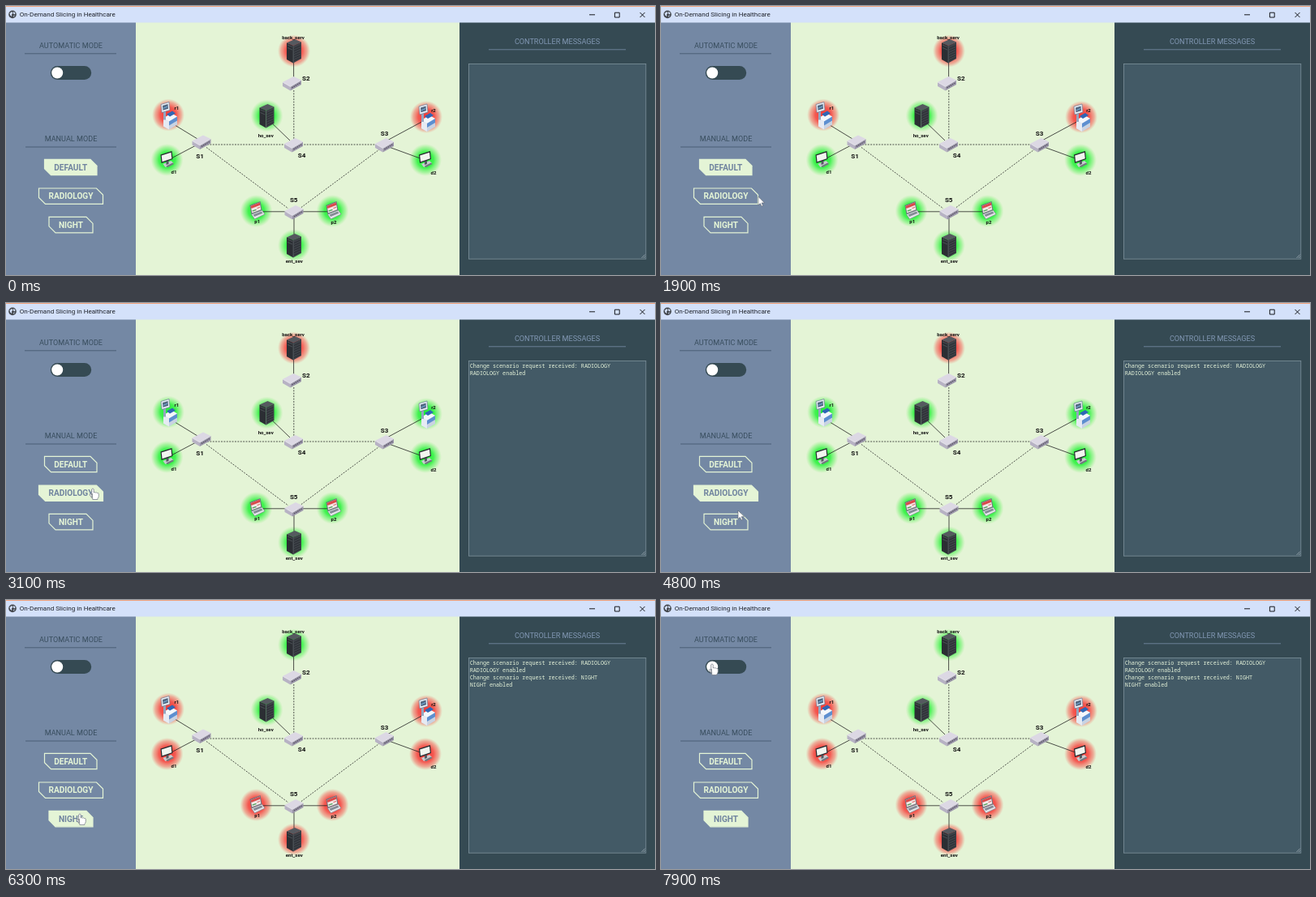
Recreate the animation shown at these times as an HTML page. Size 800 by 332 pixels, loop 8000 ms.

```html
<!DOCTYPE html>
<html lang="en">
<head>
<meta charset="utf-8">
<title>On-Demand Slicing in Healthcare</title>
<style>
html, body { margin: 0; width: 100%; height: 100%; overflow: hidden; background: #e4f4d6; }
svg { display: block; width: 100vw; height: 100vh; }
text { font-family: Roboto, Arial, sans-serif; }
.head { font-size: 9.1px; text-anchor: middle; fill: #394e5f; }
.btn text { font-size: 10.1px; font-weight: 700; text-anchor: middle; }
.btn path { stroke: #e4f4d6; stroke-width: 1.2; }
.node { font-size: 8.1px; font-weight: 700; text-anchor: middle; fill: #111; }
.host { font-size: 6.1px; font-weight: 700; text-anchor: middle; fill: #111; }
.log { font: 6.72px "Noto Sans Mono", "DejaVu Sans Mono", monospace; fill: #e6f4da; white-space: pre; }
.wire { stroke: #222; stroke-width: .8; fill: none; }
.dash { stroke-dasharray: 1.9 1.5; }
</style>
</head>
<body>
<svg id="stage" viewBox="0 0 800 332" preserveAspectRatio="none">
  <defs>
    <radialGradient id="red">
      <stop offset="0" stop-color="#f6322e"/>
      <stop offset=".5" stop-color="#f6443f" stop-opacity=".88"/>
      <stop offset=".8" stop-color="#f4655a" stop-opacity=".5"/>
      <stop offset="1" stop-color="#f08070" stop-opacity="0"/>
    </radialGradient>
    <radialGradient id="green">
      <stop offset="0" stop-color="#14f02c"/>
      <stop offset=".5" stop-color="#2cf23e" stop-opacity=".88"/>
      <stop offset=".8" stop-color="#66f264" stop-opacity=".45"/>
      <stop offset="1" stop-color="#90f080" stop-opacity="0"/>
    </radialGradient>
    <g id="server">
      <path fill="#55595f" d="M-9-10 1-14.5 9-11-1-6.5Z"/>
      <path fill="#2b2e33" d="M-9-10-1-6.5V15L-9 10.5Z"/>
      <path fill="#3d4147" d="M-1-6.5 9-11V9.5L-1 15Z"/>
      <path stroke="#22252a" stroke-width=".7" d="M0-3 8-6.6M0 0 8-3.6M0 3 8-.6M0 6 8 2.4M0 9 8 5.4M0 12 8 8.2"/>
      <path stroke="#6b7077" stroke-width=".5" fill="none" d="M-8-7.5-2-5M-8-4-2-1.4M-1-6.5V15"/>
    </g>
    <g id="switch">
      <path fill="#dcd8e4" d="M-11.5-1.5 2-8.5 11.5-4-2 4Z"/>
      <path fill="#b7b2c4" d="M-11.5-1.5-2 4V9L-11.5 3.5Z"/>
      <path fill="#9b96aa" d="M-2 4 11.5-4V1.5L-2 9Z"/>
      <path stroke="#55515f" stroke-width="1.3" stroke-dasharray="1.5 1" d="M0 5.4 10-.6"/>
      <path stroke="#f2f0f6" stroke-width=".6" fill="none" d="M-11.5-1.5-2 4 11.5-4"/>
    </g>
    <g id="scanner">
      <path fill="#c9d3e2" d="M-6 4 4-2 11 2V12L1 18-6 14Z"/>
      <path fill="#f4f7fb" d="M-6 4 4-2 11 2 1 8Z"/>
      <path fill="#5d8fd0" d="M1 8 11 2V7L1 13Z"/>
      <path fill="#e6ebf3" d="M-6 4 1 8V18L-6 14Z"/>
      <path fill="#2f66b5" d="M-2-1 5-5 9-2 2 2Z"/>
      <path fill="#94a5bf" d="M-6-5H-3V6H-6Z"/>
      <path fill="#e9eef5" stroke="#687990" stroke-width=".7" d="M-9-13 1-16 2-6-8-3Z"/>
      <path fill="#516781" d="M-7-11.5-.5-13.5 0-7.8-6.5-5.8Z"/>
      <path stroke="#7cbcec" stroke-width=".9" d="M-6-8.2-1-10.4"/>
    </g>
    <g id="screen">
      <path fill="#c8cbd0" d="M-5 5 5 1 8 4-2 9Z"/>
      <path fill="#555b62" d="M-1 1H2V5L-1 6Z"/>
      <path fill="#24282d" d="M-8-6.5 6-11 7-1-7 4Z"/>
      <path fill="#f1f5ef" d="M-6.8-5.4 5-9.3 5.8-1.8-5.9 2.3Z"/>
      <path fill="#71777e" d="M-1 7.5 7 3.5 8.5 5 .6 9.3Z"/>
    </g>
    <g id="laptop">
      <path fill="#e5e6ea" stroke="#777c86" stroke-width=".6" d="M-6 4 7-1 10.5 4-2 10Z"/>
      <path fill="#858b96" d="M-4 4.5 6.3.6 8 2.8-2.2 7Z"/>
      <path fill="#6d727d" d="M-8-7 5-12 7-1-6 4Z"/>
      <path fill="#f3e8e6" d="M-6.8-6 4.2-10.4 5.8-1.8-5.2 2.4Z"/>
      <path fill="#d94a4b" d="M-6.8-6 4.2-10.4 4.8-7.2-6.2-3Z"/>
      <path stroke="#50a35c" stroke-width="1.3" d="M-4.8.2 0-1.6"/>
      <path stroke="#d97272" stroke-width="1.2" d="M1-3.3 4.5-4.7"/>
    </g>
    <path id="arrow" fill="#fff" stroke="#555d69" stroke-width=".6" stroke-linejoin="round"
      d="M0 0V10.6L2.4 8.4 4 12 5.7 11.3 4.2 7.7H7.5Z"/>
    <path id="hand" fill="#fff" stroke="#747b86" stroke-width=".75" stroke-linejoin="round"
      d="M-1.3.8Q0-1 1.2.8V5Q2.4 4 3.4 5.1 4.6 4.3 5.5 5.6 7.2 5 7.3 6.7V9.5Q7 11.5 5.9 12.4V13.5H-.2Q-1-.1 -1.3 11.5L-3.8 7.7Q-3.7 6.2-2.4 6.8L-1.3 8Z"/>
  </defs>
  <rect width="800" height="332" fill="#e4f4d6"/>
  <rect y="20" width="160" height="312" fill="#7488a4"/>
  <rect x="559" y="20" width="241" height="312" fill="#354a53"/>
  <rect width="800" height="20.5" fill="#d4e1fa"/>
  <rect width="800" height="1" fill="#f0a27c"/>
  <circle cx="8" cy="10.4" r="4.8" fill="#44484e"/>
  <path fill="#d4e1fa" d="M4.5 9 7.2 7 8.6 8.7 7 10.2 7.3 13 5.2 11.6ZM9.2 6.8 11.6 8.7 10.6 10.4 9 9.4ZM9 12 11 11.6 9.6 13.7Z"/>
  <text x="16.8" y="13.4" font-size="8.1" fill="#1d2129">On-Demand Slicing in Healthcare</text>
  <path stroke="#16181c" stroke-width="1" fill="none" d="M719 10.8H726M750.4 8.2H756.2V14H750.4ZM781.5 8 787.5 14M787.5 8 781.5 14"/>
  <text class="head" x="80" y="51.6">AUTOMATIC MODE</text>
  <text class="head" x="80" y="167">MANUAL MODE</text>
  <text class="head" x="679.5" y="46.6" style="fill:#8298b4">CONTROLLER MESSAGES</text>
  <path stroke="#40546a" stroke-width=".8" d="M23 58.8H136M24 174H136"/>
  <path stroke="#7b91ab" stroke-width=".8" d="M595 53.8H764"/>
  <rect x="54.8" y="74" width="50.4" height="17" rx="8.5" fill="#354a53"/>
  <circle cx="63.2" cy="82.5" r="7" fill="#fff"/>
  <rect x="570.4" y="71.4" width="218.4" height="240.8" fill="#435a66" stroke="#7d919b" stroke-width=".8"/>
  <path stroke="#b5c0c6" stroke-width=".7" d="M783.5 311 787.8 306.7M786 311 787.8 309.2"/>
  <g id="net"></g>
  <g id="buttons"></g>
  <g id="log"></g>
  <use id="cursor"/>
</svg>
<script>
const $ = id => document.getElementById(id);
const LOOP = 8000, STEP = 100;
const INK = "#70849f", PALE = "#e4f4d6";

// name, icon, icon x, y, label x, baseline
const hosts = [
  ["back_serv", "server", 355, 55.5, 354, 40.6],
  ["ho_sev", "server", 321.5, 135.5, 320.2, 162.4],
  ["ent_sev", "server", 355, 295.5, 355.3, 316.6],
  ["r1", "scanner", 200, 134.5, 210.3, 127.6],
  ["r2", "scanner", 518, 137, 527, 130.6],
  ["d1", "screen", 198.5, 190, 207, 207.4],
  ["d2", "screen", 517, 190, 527, 207.8],
  ["p1", "laptop", 308.5, 253, 309.8, 268.4],
  ["p2", "laptop", 402.5, 253, 404, 269]
];
const switches = [
  ["S1", 241, 168, 239, 188], ["S2", 352.5, 95.5, 369.8, 92.4], ["S3", 466.5, 171.5, 466.5, 160],
  ["S4", 354.5, 171.5, 364.6, 187.2], ["S5", 355, 254.5, 354.7, 241.6]
];
const isRed = {
  DEFAULT: n => /^(back|r)/.test(n),
  RADIOLOGY: n => n === "back_serv",
  NIGHT: n => !/^(back|ho)/.test(n)
};
// label, left, right, top
const buttons = [["DEFAULT", 47.5, 112, 189.3], ["RADIOLOGY", 40.5, 119.5, 225], ["NIGHT", 53, 107, 260.4]];
const HEIGHT = 19.4;
const clicks = [[2900, "RADIOLOGY"], [5500, "NIGHT"]];
const APPLY = 200;

// time, x, y of the pointer
const path = [
  [700, 152, 345], [1200, 140, 244], [1400, 140, 244], [2200, 108, 230], [2500, 107, 229],
  [4300, 107, 229], [4800, 95, 256], [5200, 91, 264], [6300, 91, 264],
  [7100, 76, 108], [7600, 63, 80], [7900, 63, 79]
];

$("net").innerHTML =
  hosts.map(([n, , x, y]) => `<circle id="${n}" cx="${x}" cy="${y}" r="20"/>`).join("") +
  `<path class="wire" d="M354.6 66V90M322 139 350 166M200 142 236 164M200 190 236 171M518 140 466 168M516 190 472 174M310 253.8H402M355 258V290"/>
   <path class="wire dash" d="M354.8 104V164M248 171H346M364 171H458M247 174.5 348 250M461 176.5 362 250"/>` +
  hosts.map(([n, icon, x, y, lx, ly]) =>
    `<use href="#${icon}" x="${x}" y="${y}"/><text class="host" x="${lx}" y="${ly}">${n}</text>`).join("") +
  switches.map(([n, x, y, lx, ly]) =>
    `<use href="#switch" x="${x}" y="${y}"/><text class="node" x="${lx}" y="${ly}">${n}</text>`).join("");

$("buttons").innerHTML = buttons.map(([n, l, r, y]) =>
  `<g class="btn" id="${n}"><path d="M${l} ${y}H${r - 8}L${r} ${y + 8}V${y + HEIGHT}H${l + 8}L${l} ${y + HEIGHT - 8}Z"/>
   <text x="${(l + r) / 2}" y="${y + 13.3}">${n}</text></g>`).join("");

$("log").innerHTML = clicks.flatMap(([t, n]) =>
  [[t, `Change scenario request received: ${n}`], [t + APPLY, `${n} enabled`]])
  .map(([t, s], i) => `<text class="log" data-at="${t}" x="571.8" y="${79.8 + i * 8.95}">${s}</text>`).join("");

const lines = [...document.querySelectorAll(".log")];

function pointer(t) {
  const i = path.findIndex(p => p[0] > t);
  if (i < 0) return path[path.length - 1].slice(1);
  if (i === 0) return [-50, -50];
  const [a, b] = [path[i - 1], path[i]];
  const k = (t - a[0]) / (b[0] - a[0]);
  return [a[1] + (b[1] - a[1]) * k, a[2] + (b[2] - a[2]) * k];
}

const scenario = t => clicks.reduce((s, [at, n]) => t >= at ? n : s, "DEFAULT");

function draw(time) {
  const t = Math.floor(time % LOOP / STEP) * STEP;
  const [x, y] = pointer(t);
  const chosen = scenario(t), active = scenario(t - APPLY);
  let link = x > 55 && x < 105 && y > 74 && y < 91;

  for (const [n, l, r, top] of buttons) {
    const over = x > l && x < r && y > top && y < top + HEIGHT;
    const on = n === chosen;
    const [shape, label] = $(n).children;
    link = link || over;
    shape.style.fill = on ? PALE : over ? "#fff" : "none";
    shape.style.stroke = over && !on ? "#fff" : PALE;
    label.style.fill = on || over ? INK : PALE;
  }
  for (const [n] of hosts) $(n).setAttribute("fill", `url(#${isRed[active](n) ? "red" : "green"})`);
  for (const el of lines) el.style.display = t >= +el.dataset.at ? "" : "none";

  $("cursor").setAttribute("href", link ? "#hand" : "#arrow");
  $("cursor").setAttribute("transform", `translate(${x} ${y})`);
}

const start = performance.now();
function tick() {
  draw(performance.now() - start);
  requestAnimationFrame(tick);
}
tick();
</script>
</body>
</html>
```
